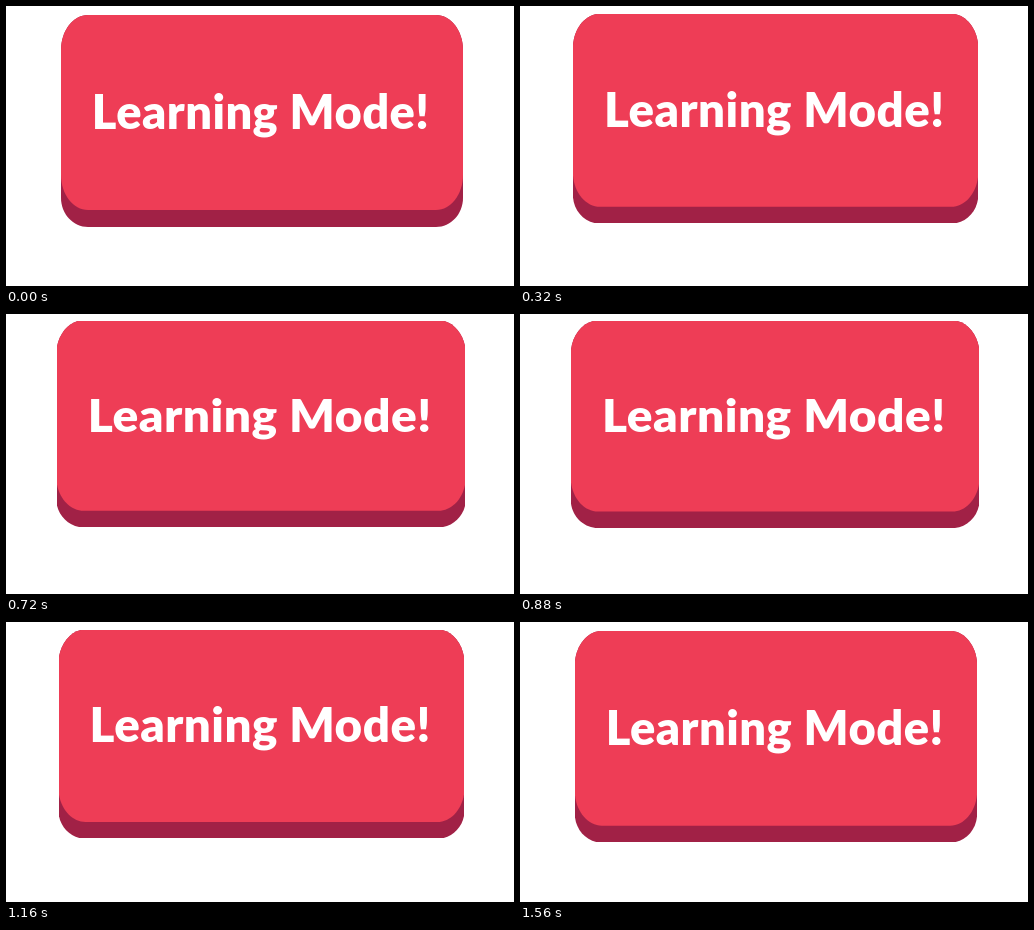
Write an HTML page with a canvas that moves like this. It is 508 by 280 pixels and loops after 1600 ms.

```html
<!DOCTYPE html>
<html lang="en">
<head>
<meta charset="utf-8">
<title>Learning Mode</title>
<style>
  html, body { margin: 0; width: 100%; height: 100%; overflow: hidden; background: #fff; }
  canvas { display: block; }
</style>
</head>
<body>
<canvas id="stage" width="508" height="280"></canvas>
<script>
const ctx = document.getElementById('stage').getContext('2d');
const LOOP = 1600, PEAK = 760, STEP = 40;
const LEFT = 55, RIGHT = 457, TOP = 9, FACE_BOTTOM = 204, BOTTOM = 221;

const mix = (a, b, k) => a + (b - a) * k;

// Rounded slab with separate vertical radii for its upper and lower corners.
function slab(bottom, topRadius, lowRadius, color) {
  const rx = 27, k = 0.45;
  ctx.beginPath();
  ctx.moveTo(LEFT + rx, TOP);
  ctx.lineTo(RIGHT - rx, TOP);
  ctx.bezierCurveTo(RIGHT - rx * k, TOP, RIGHT, TOP + topRadius * k, RIGHT, TOP + topRadius);
  ctx.lineTo(RIGHT, bottom - lowRadius);
  ctx.bezierCurveTo(RIGHT, bottom - lowRadius * k, RIGHT - rx * k, bottom, RIGHT - rx, bottom);
  ctx.lineTo(LEFT + rx, bottom);
  ctx.bezierCurveTo(LEFT + rx * k, bottom, LEFT, bottom - lowRadius * k, LEFT, bottom - lowRadius);
  ctx.lineTo(LEFT, TOP + topRadius);
  ctx.bezierCurveTo(LEFT, TOP + topRadius * k, LEFT + rx * k, TOP, LEFT + rx, TOP);
  ctx.fillStyle = color;
  ctx.fill();
}

function draw(ms) {
  const t = Math.floor((ms % LOOP) / STEP) * STEP;
  const press = t < PEAK ? t / PEAK : (LOOP - t) / (LOOP - PEAK);
  const left = mix(LEFT, 50, press), right = mix(RIGHT, 460, press);
  const top = mix(TOP, 6, press), bottom = mix(BOTTOM, 213, press);
  const sx = (right - left) / (RIGHT - LEFT), sy = (bottom - top) / (BOTTOM - TOP);

  ctx.fillStyle = '#fff';
  ctx.fillRect(0, 0, 508, 280);

  ctx.save();
  // Keep only whole pixels so the straight edges stay crisp.
  const x = Math.ceil(left), y = Math.ceil(top);
  ctx.beginPath();
  ctx.rect(x, y, Math.floor(right) - x, Math.floor(bottom) - y);
  ctx.clip();

  ctx.transform(sx, 0, 0, sy, left - LEFT * sx, top - TOP * sy);
  slab(BOTTOM, 35, 29, '#a12146');
  slab(FACE_BOTTOM, 35, 35, '#ee3d56');

  ctx.fillStyle = '#fff';
  ctx.font = '900 47px Lato, sans-serif';
  ctx.letterSpacing = '0.45px';
  ctx.textAlign = 'center';
  ctx.fillText('Learning Mode!', 254.7, 123);
  ctx.restore();
}

function frame() {
  draw(performance.now());
  requestAnimationFrame(frame);
}
frame();
</script>
</body>
</html>
```
